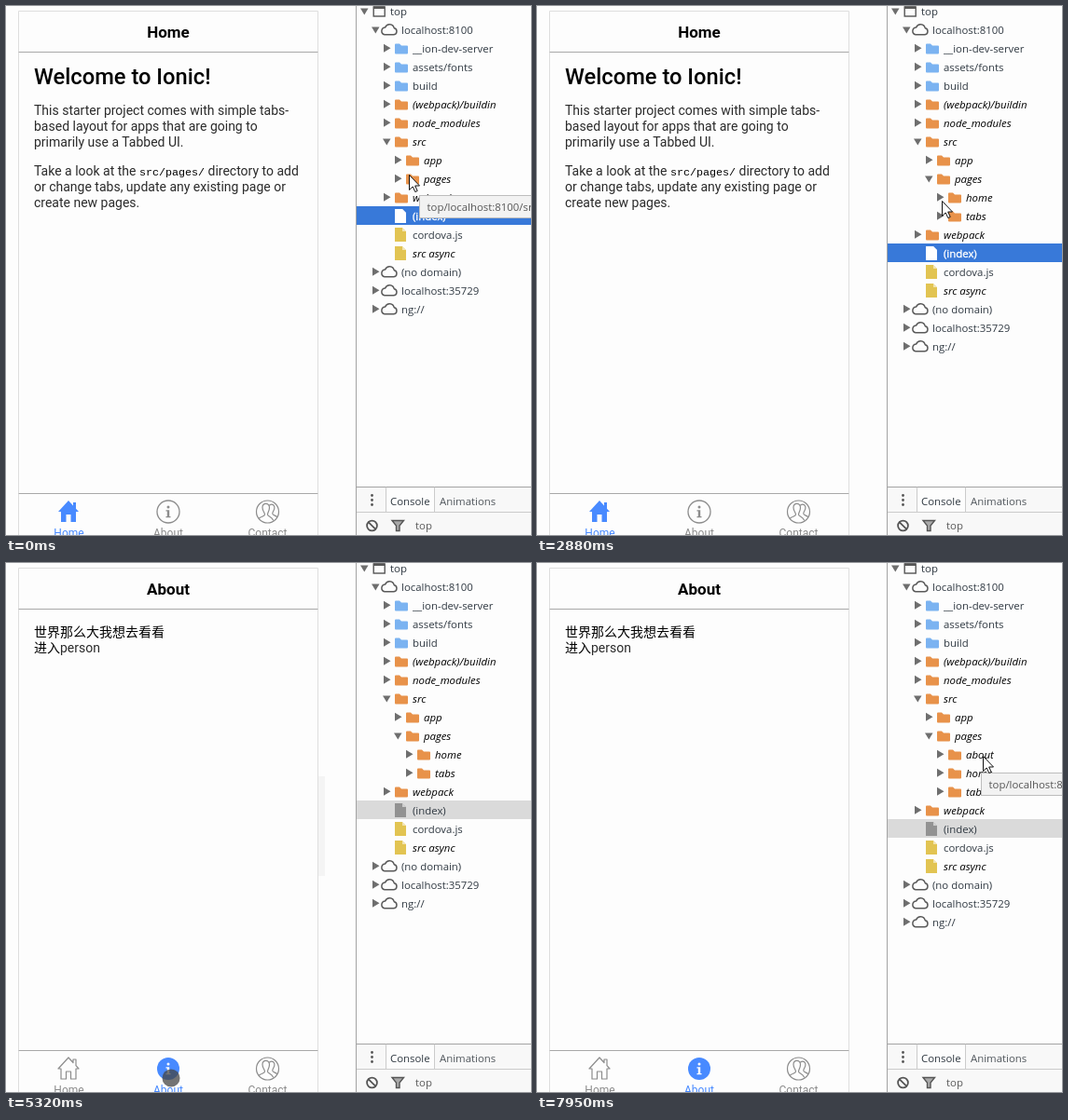
Write an HTML page that moves like this. It is 563x568 px and loops after 8000 ms.

```html
<!DOCTYPE html>
<html lang="en">
<head>
<meta charset="utf-8">
<style>
html, body { margin: 0; width: 100%; height: 100%; overflow: hidden; background: #fdfdfd; }
svg { display: block; }
.app { font: 14px Roboto, 'Noto Sans CJK SC', 'Noto Sans CJK', sans-serif; fill: #2b2b2b; }
.title { font-size: 17px; font-weight: 600; fill: #000; text-anchor: middle; }
.head { font-size: 23.7px; font-weight: 500; fill: #000; }
.code { font: 11.7px 'Liberation Mono', monospace; fill: #000; }
.label { font-size: 12px; text-anchor: middle; }
.dev { font: 11.4px 'Open Sans', 'Noto Sans', sans-serif; fill: #303942; }
.mapped { font-style: italic; fill: #000; }
.picked { fill: #fff; stroke: #fff; stroke-width: .35; }
.line { fill: none; stroke-linejoin: round; stroke-linecap: round; }
</style>
</head>
<body>
<svg id="stage" width="563" height="568" viewBox="0 0 563 568"></svg>
<script>
const LOOP = 8000, BLUE = '#488aff', GRAY = '#8c8c8c';
const OPEN_PAGES = 1220, LOSE_FOCUS = 4760, SHOW_ABOUT = 5320, LOAD_ABOUT = 5440;

// start, end, number of steps, points passed at even intervals
const moves = [
  [120, 510, 4, [[432, 181], [419, 185]]],
  [1680, 2610, 8, [[419, 185], [450, 197], [480, 203], [460, 209], [434, 209]]],
  [2760, 3420, 6, [[434, 209], [433, 209], [434, 209], [417, 215], [440, 222], [465, 228], [478, 229]]],
  [3730, 4480, 6, [[478, 229], [177, 553]]],
  [5720, 6650, 8, [[177, 553], [240, 490], [310, 430], [376, 374], [400, 340], [425, 300], [445, 265], [458, 240], [465, 229]]],
  [6800, 6950, 2, [[465, 229], [478, 207]]],
  [7410, 7950, 5, [[478, 207], [465, 206], [452, 206], [449, 205], [464, 206], [478, 207]]]
];

const text = (x, y, s, cls = '', fill = '') =>
  `<text x="${x}" y="${y}" class="${cls}"${fill && ` style="fill:${fill}"`}>${s}</text>`;
const rect = (x, y, w, h, fill, more = '') =>
  `<rect x="${x}" y="${y}" width="${w}" height="${h}" fill="${fill}" ${more}/>`;
const path = (d, fill, more = '') => `<path d="${d}" fill="${fill}" ${more}/>`;
const line = (d, color, width = 1) =>
  `<path class="line" d="${d}" stroke="${color}" stroke-width="${width}"/>`;
const circle = (x, y, r, fill, more = '') =>
  `<circle cx="${x}" cy="${y}" r="${r}" fill="${fill}" ${more}/>`;
const at = (x, y, s) => `<g transform="translate(${x} ${y})">${s}</g>`;

function pointer(t) {
  let pos = moves[0][3][0];
  for (const [start, end, steps, pts] of moves) {
    if (t < start) break;
    const step = Math.min(steps, Math.floor((t - start) / (end - start) * (steps - 1) + .12) + 1);
    const p = step / steps * (pts.length - 1);
    const i = Math.min(Math.floor(p), pts.length - 2);
    pos = pts[i].map((v, k) => Math.round(v + (pts[i + 1][k] - v) * (p - i)));
  }
  return pos;
}

function drawPointer([x, y]) {
  if (x < 335) return circle(x, y, 9.5, '#444', 'opacity=".75"');
  if (Math.abs(x - 376) < 4) return at(x, y, path(
    'M-11 0L-6-5V-2H6V-5L11 0L6 5V2H-6V5Z', '#fff', 'stroke="#222" stroke-width="1.2"') +
    line('M0-5V-2M0 2V5', '#222', 1.2));
  return at(x, y, path('M.5.5V16.5L4.2 13L6.8 18.6L9.2 17.5L6.7 12H11.5Z', '#fff', 'stroke="#111"'));
}

function tabs(about) {
  const house = 'M-11 1L0-11L5-5.5V-9H8V-2.3L11 1H8V12H2.5V4H-2.5V12H-8V1Z';
  const ink = about ? '#fff' : GRAY;
  const info = circle(0, 0, 12, about ? BLUE : 'none', about ? '' : `stroke="${GRAY}" stroke-width="1.3"`) +
    circle(0, -5, 1.5, ink) + path('M-2.5-1.8H1.2V5H2.5V6.2H-2.5V5H-1.2V-.6H-2.5Z', ink);
  const people = circle(0, 0, 12, 'none', `stroke="${GRAY}" stroke-width="1.2"`) +
    line('M-9 7C-7 5-3 5-3 3C-3 1-5.5-1-5.5-4.5C-5.5-10 2-10 2-4.5C2-1 0 1 0 3C0 5 4 5 6 9', GRAY, 1.2) +
    line('M2-7C5.5-9.5 8-6.5 7.3-3.5C7-1 5 .5 5.3 2.2C5.7 4 9 4 10 5.5', GRAY, 1.2);
  return at(67, 542, about ? line(house, GRAY, 1.2) : path(house, BLUE)) +
    at(174, 543, info) + at(280.5, 543, people) +
    text(67.5, 570, 'Home', 'label', about ? GRAY : BLUE) +
    text(174, 570, 'About', 'label', about ? BLUE : GRAY) +
    text(280.5, 570, 'Contact', 'label', GRAY);
}

function app(t) {
  const about = t >= SHOW_ABOUT;
  let s = line('M13.5 568V5.5H334.5V568', '#dedede') +
    line('M14 49.5H334M14 523.5H334', '#a8a8a8') +
    text(174, 34, about ? 'About' : 'Home', 'title');
  if (about) {
    s += text(30, 79, '世界那么大我想去看看', '', '#000') +
      text(30, 96, '<tspan fill="#000">进入</tspan>person');
  } else {
    s += text(30, 84, 'Welcome to Ionic!', 'head') +
      text(30, 117, 'This starter project comes with simple tabs-') +
      text(30, 134, 'based layout for apps that are going to') +
      text(30, 151, 'primarily use a Tabbed UI.') +
      text(30, 182, 'Take a look at the') +
      text(143, 182, 'src/pages/', 'code') +
      text(216.5, 182, 'directory to add') +
      text(30, 199, 'or change tabs, update any existing page or') +
      text(30, 216, 'create new pages.');
  }
  // edge highlight left by the pointer
  if (t >= 4200 && t < 5870) s += rect(335, 229, 7, 107, '#f4f4f4');
  if (t >= 5870 && t < 6500) s += rect(335, 50, 7, 473, '#f4f4f4') + rect(326, 50, 6, 473, '#f6f6f6');
  return `<g class="app">${s}${tabs(about)}</g>`;
}

const icons = {
  frame: () => rect(-17.8, -4.5, 12, 10, 'none', 'stroke="#555" stroke-width="1.4"') + rect(-18, -5, 12, 2.5, '#555'),
  cloud: () => line('M-18 5.3H-8.5A3.6 3.6 0 0 0-7.8-1.8A5 5 0 0 0-17.3-2.6A4 4 0 0 0-18 5.3Z', '#5a5a5a', 1.5),
  folder: c => path('M-19-4Q-19-5-18-5H-14L-12-3H-6Q-5-3-5-2V5Q-5 6-6 6H-18Q-19 6-19 5Z', c),
  file: c => path('M-19-7.5H-11L-7-3.5V7.5H-19Z', c) + path('M-11-7.5V-3.5H-7Z', '#fff', 'opacity=".55"')
};

function tree(t) {
  const opened = t >= OPEN_PAGES, loaded = t >= LOAD_ABOUT, focus = t < LOSE_FOCUS;
  const orange = '#e8924a', sky = '#7bb3f1', yellow = '#e2c452';
  // depth, label, icon, colour, arrow, style
  const dir = (depth, name, open) => [depth, name, 'folder', orange, open ? 'open' : 'shut', 'mapped'];
  const plain = name => [2, name, 'folder', sky, 'shut', ''];
  const host = (name, open) => [1, name, 'cloud', '', open ? 'open' : 'shut', ''];
  const rows = [
    [0, 'top', 'frame', '', 'open', ''],
    host('localhost:8100', true),
    plain('__ion-dev-server'), plain('assets/fonts'), plain('build'),
    dir(2, '(webpack)/buildin'), dir(2, 'node_modules'), dir(2, 'src', true),
    dir(3, 'app'), dir(3, 'pages', opened),
    ...(loaded ? [dir(4, 'about')] : []),
    ...(opened ? [dir(4, 'home'), dir(4, 'tabs')] : []),
    dir(2, 'webpack'),
    [2, '(index)', 'file', focus ? '#fff' : '#929292', '', focus ? 'picked' : ''],
    [2, 'cordova.js', 'file', yellow, '', ''],
    [2, 'src async', 'file', yellow, '', 'mapped'],
    host('(no domain)'), host('localhost:35729'), host('ng://')
  ];
  return rows.map(([depth, name, icon, color, arrow, cls], i) => {
    const y = 5.5 + i * 20;
    const mark = arrow === 'open' ? path('M-32-3H-23.5L-27.7 4Z', '#6e6e6e')
      : arrow ? path('M-31-4.8V4.2L-23.5-.3Z', '#6e6e6e') : '';
    return (name === '(index)' ? rect(376, y - 10.5, 187, 20, focus ? '#3879d9' : '#dadada') : '') +
      at(412 + depth * 12, y, mark + icons[icon](color) + text(0, 4.5, name, cls));
  }).join('');
}

function drawer() {
  return rect(376, 517, 187, 51, '#f8f8f8') + rect(407, 517, 53, 26, '#fdfdfd') +
    line('M376 516.5H563', '#a3a3a3') +
    line('M376 543.5H563M407.5 517V543M459.5 517V543', '#cbcbcb') +
    [525.5, 530.5, 535.5].map(y => circle(392.5, y, 1.4, '#555')).join('') +
    text(412, 536, 'Console') + text(465, 536, 'Animations', '', '#50565c') +
    circle(392.5, 558, 5.4, 'none', 'stroke="#555" stroke-width="1.8"') +
    line('M388.8 554.3L396.2 561.7', '#555', 1.8) +
    path('M414 552.5H426.5L422 558V563.5H418.5V558Z', '#aaa', 'stroke="#555" stroke-width="1.4"') +
    text(439, 562, 'top', '', '#5a5a5a');
}

function tooltip(t) {
  const [x, y, page] = t < OPEN_PAGES ? [443, 203, '']
    : t >= 6950 ? [476, 225, '/about']
    : t >= 6650 && t < 6800 ? [473, 243, '/home'] : [];
  return x ? rect(x + .5, y + .5, 200, 24, '#f2f2f2', 'stroke="#bdbdbd"') +
    text(x + 8.5, y + 17, `top/localhost:8100/src/pages${page}`, '', '#575757') : '';
}

const stage = document.getElementById('stage');
let shown = '';
function draw(now) {
  const t = now % LOOP;
  const picture = app(t) + `<g class="dev">${tree(t)}${drawer()}${line('M375.5 0V568', '#a3a3a3')}${tooltip(t)}</g>` +
    drawPointer(pointer(t));
  if (picture !== shown) stage.innerHTML = shown = picture;
}

const began = performance.now();
function tick() {
  draw(performance.now() - began);
  requestAnimationFrame(tick);
}
tick();
</script>
</body>
</html>
```
